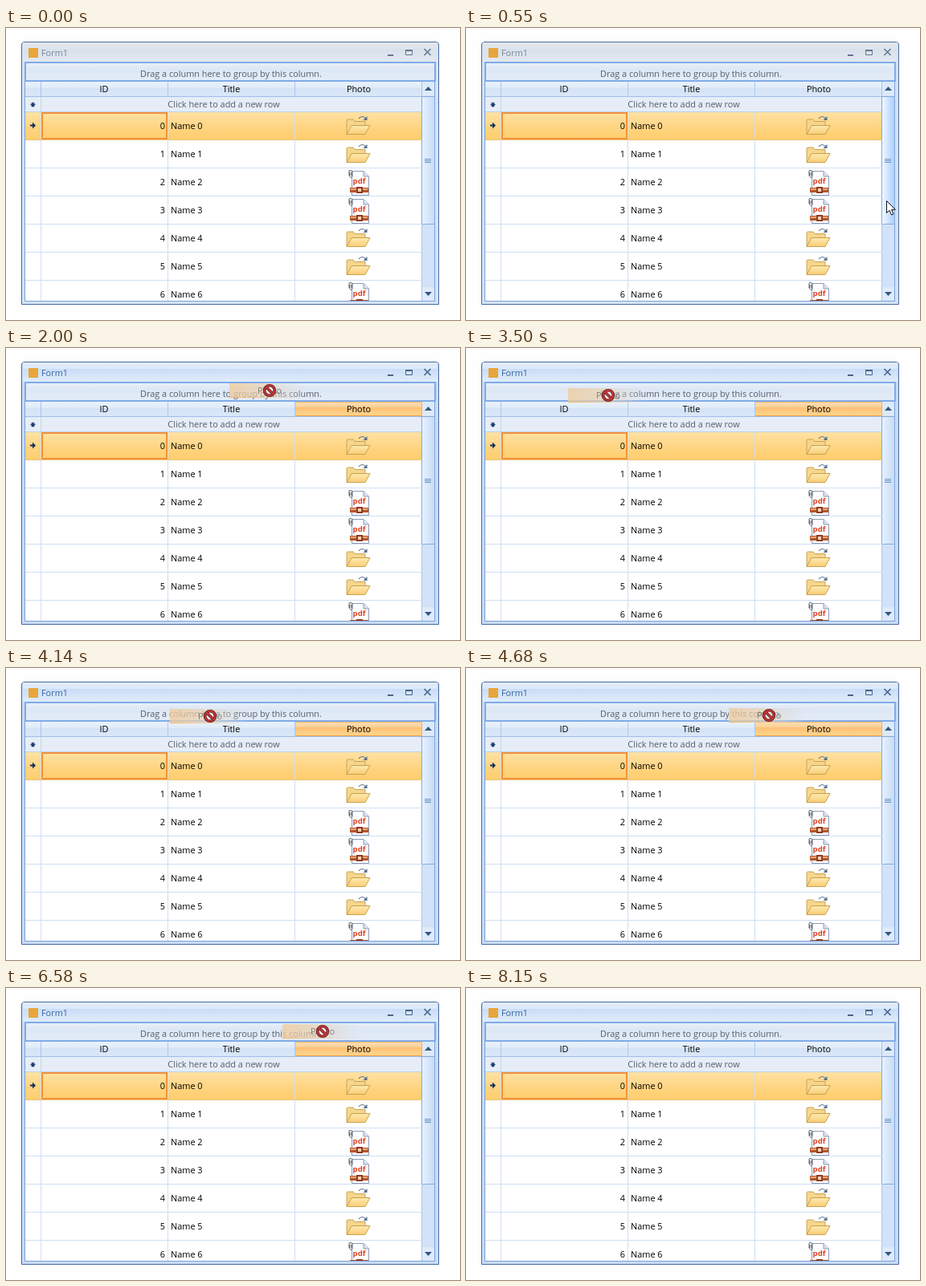
Recreate the animation shown at these times as an HTML page. Size 565 px wide and 364 px high, loop 8690 ms.

```html
<!DOCTYPE html>
<html lang="en">
<head>
<meta charset="utf-8">
<title>Grid column drag</title>
<style>
html, body { margin: 0; width: 100%; height: 100%; overflow: hidden; background: #fefefe; }
svg { display: block; width: 565px; height: 364px; }
text { font: 10.9px "Open Sans", "Noto Sans", sans-serif; fill: #000; }
rect { shape-rendering: crispEdges; }
.mid { text-anchor: middle; }
.end { text-anchor: end; }
.soft { fill: #535c6b; }
</style>
</head>
<body>
<svg id="stage" viewBox="0 0 565 364" xmlns="http://www.w3.org/2000/svg">
<defs>
  <clipPath id="client"><rect x="24" y="43" width="494" height="297"/></clipPath>
  <g id="folder">
    <path d="M1 23.500V6L2 5H9L11 7.500H24V13" fill="#f6d68d" stroke="#c9a352"/>
    <path d="M1 23.500L7 12.500H30L24 23.500Z" fill="url(#gFolder)" stroke="#c9a04e" stroke-linejoin="round"/>
    <path d="M16 4Q20 -1 25 4" fill="none" stroke="#566f8c" stroke-width="1.2"/>
    <path d="M26.500 1V6H21.500Z" fill="#566f8c"/>
  </g>
  <g id="pdf">
    <path d="M5.500 1.500H20L26.500 8V31.500H5.500Z" fill="#fdfdff" stroke="#8f9bb5"/>
    <path d="M20 1.500V8H26.500" fill="#dbe2ef" stroke="#8f9bb5"/>
    <text x="14.500" y="17" class="mid" style="font-size:9.600px;font-weight:700;fill:#e2401c">pdf</text>
    <rect x="3" y="22" width="23" height="6" fill="#b5562c"/>
    <rect x="4" y="23" width="21" height="2" fill="#eda676"/>
    <rect x="11" y="21" width="8" height="8" fill="#8d3d24"/>
    <rect x="13" y="23" width="4" height="4" fill="#f6d3ae"/>
    <path d="M2.500 3V8Q4 11 6 8V2Q5 -1 2 1V7M4.200 3V7" fill="none" stroke="#59626f"/>
  </g>
</defs>
<g id="scene"></g>
<g id="hover"></g>
<g id="cells"></g>
<g id="mark" fill="#10305c">
  <path d="M360 67V88" stroke="#10305c" stroke-width="2" stroke-dasharray="2 1"/>
  <path d="M358.500 63.500H361.500V65.500H364L360 70L356 65.500H358.500Z"/>
  <path d="M358.500 91.500H361.500V89H364L360 84.500L356 89H358.500Z"/>
</g>
<g id="ghost">
  <rect width="98" height="18" fill="url(#gGhost)"/>
  <rect y="17" width="98" height="1" fill="url(#gEdge)"/>
  <text x="50" y="13" class="mid" fill-opacity=".42">Photo</text>
</g>
<g id="point">
  <rect id="box" x="3.500" y="14.500" width="11" height="9" fill="#fff" stroke="#111" stroke-width="1.500" stroke-dasharray="2 1"/>
  <path d="M.5 .5V15.500L4 12.300L6.500 18L8.900 17L6.500 11.300H11.300Z" fill="#fff" stroke="#111"/>
</g>
<g id="deny" fill="none">
  <circle r="6.300" fill="#fff" fill-opacity=".75" stroke="#64191b" stroke-width="3.600"/>
  <path d="M-4.500 -4.500L4.500 4.500" stroke="#64191b" stroke-width="3.400"/>
  <circle r="6.300" stroke="#c8393a" stroke-width="1.800"/>
  <path d="M-4.500 -4.500L4.500 4.500" stroke="#c8393a" stroke-width="1.800"/>
</g>
</svg>
<script>
const LOOP = 8690;
const STEP = 400 / 3; // the screen refreshes 7.5 times a second
const NS = "http://www.w3.org/2000/svg";
const $ = id => document.getElementById(id);
const defs = document.querySelector("defs");

function add(parent, tag, attrs, content) {
  const el = document.createElementNS(NS, tag);
  for (const k in attrs) el.setAttribute(k, attrs[k]);
  if (content !== undefined) el.textContent = content;
  parent.appendChild(el);
  return el;
}
const rect = (p, x, y, width, height, fill, more) =>
  add(p, "rect", { x, y, width, height, fill, ...more });
const label = (p, x, y, s, cls = "") => add(p, "text", { x, y, class: cls }, s);
const line = (p, d, stroke, w = 1) => add(p, "path", { d, stroke, fill: "none", "stroke-width": w });

// Each stop is [offset, colour, opacity].
function gradient(id, stops, across) {
  const g = add(defs, "linearGradient", { id, x2: across ? 1 : 0, y2: across ? 0 : 1 });
  for (const [offset, color, alpha = 1] of stops)
    add(g, "stop", { offset, "stop-color": color, "stop-opacity": alpha });
}
// Two glossy bands that meet at the given offset.
const gloss = (id, at, a, b, c, d) => gradient(id, [[0, a], [at, b], [at, c], [1, d]]);

gloss("gBar", .35, "#e3ebf6", "#dae9fd", "#cadef7", "#e0ecfc");
gloss("gBarOff", .35, "#e3e7ec", "#dee5ec", "#d8e1ec", "#e3e8ef");
gloss("gPanel", .3, "#eaf0fa", "#dfe8f5", "#dde7f5", "#e3ebf7");
gloss("gHead", .45, "#eaf2fc", "#dfeaf8", "#d3e3f7", "#dae7f8");
gloss("gHot", .45, "#fff6d0", "#fff0b0", "#ffe995", "#fff0a8");
gloss("gDown", .4, "#fce0b8", "#fdcf92", "#fdc074", "#fed890");
gradient("gPick", [[0, "#ffe2a4"], [.5, "#ffd584"], [1, "#ffcd6a"]]);
gradient("gRow", [[0, "#fffbea"], [1, "#ffefbd"]]);
gradient("gFolder", [[0, "#ffeab0"], [1, "#f8cd76"]]);
gradient("gThumb", [[0, "#e9f2fe"], [1, "#c6dbf7"]], true);
gradient("gThumbHot", [[0, "#f3f9ff"], [1, "#a9ceff"]], true);
gradient("gGhost", [[0, "#f0cb9c", .8], [.35, "#ead0ac", .7], [.7, "#dfd8cd", .45], [1, "#dfe0e0", 0]], true);
gradient("gEdge", [[0, "#f1a54b", .7], [1, "#f3c07f", 0]], true);

// Window frame and title bar
const scene = $("scene");
const frame = add(scene, "path", {
  d: "M19.500 344.500V21Q19.500 17.500 23 17.500H535Q538.500 17.500 538.500 21V344.500Z",
  stroke: "#4a6ba0"
});
const bar = rect(scene, 21, 18, 516, 24);
rect(scene, 28, 25, 12, 12, "#e8a53a");
const title = label(scene, 44, 35, "Form1");
const buttons = add(scene, "g", {});
rect(buttons, 475, 33, 7, 2, "currentColor");
line(buttons, "M497.500 27V33.500H505.500V27M497 27.500H506M497 28.500H506", "currentColor");
line(buttons, "M520.500 26L528.500 34M528.500 26L520.500 34", "currentColor", 1.6);

rect(scene, 23, 42, 511, 299, "#7ba2d6");
rect(scene, 24, 43, 509, 297, "#fff");
rect(scene, 24, 43, 510, 23, "url(#gPanel)", { stroke: "#7fabe8", "stroke-width": 2 });
label(scene, 280, 61, "Drag a column here to group by this column.", "mid soft");

rect(scene, 24, 67, 494, 18, "url(#gHead)");
rect(scene, 24, 85, 494, 1, "#9ebfe9");
rect(scene, 24, 86, 494, 18, "#e6edf7");
rect(scene, 24, 104, 494, 1, "#b9d0ee");
rect(scene, 24, 105, 494, 35, "url(#gPick)");

// Scroll bar
rect(scene, 517, 67, 16, 273, "#d2e2f8");
rect(scene, 517, 67, 1, 273, "#a9c5e8");
for (const y of [67, 323]) rect(scene, 518, y, 15, 17, "#deeafa");
add(scene, "path", { d: "M521 78H530L525.500 73Z M521 329H530L525.500 334Z", fill: "#35577f" });
const thumb = rect(scene, 517.5, 85.5, 16, 159, "", { stroke: "#86aada" });
for (const y of [163, 165, 167]) rect(scene, 521, y, 8, 1, "#6d92c3");

// Highlights below the text
const hover = $("hover");
const rowHot = rect(hover, 24, 105, 494, 34, "url(#gRow)");
const headHot = rect(hover, 360, 67, 157, 18, "url(#gHot)");
const headDown = add(hover, "g", {});
rect(headDown, 360, 67, 157, 18, "url(#gDown)");
line(headDown, "M359.500 85.500V67.500H517.500V85", "#eeb468");
line(headDown, "M360 84.500H517", "#f29a3c");

// Grid text, lines and icons
const cells = add($("cells"), "g", { "clip-path": "url(#client)" });
["ID", "Title", "Photo"].forEach((s, i) => label(cells, 122 + 158.5 * i, 80, s, "mid"));
label(cells, 271, 99, "Click here to add a new row", "mid soft");
line(cells, "M30.500 95.500H36.500M33.500 92.500V98.500M31.500 93.500L35.500 97.500M35.500 93.500L31.500 97.500", "#1f3f70", 1.2);
add(cells, "path", { d: "M30 120.500H33V117.500L37 121.500L33 125.500V122.500H30Z", fill: "#10305c" });
for (let x = 43; x < 517; x += 158) {
  rect(cells, x, 67, 1, 18, "#a9c7ee");
  rect(cells, x, 105, 1, 235, "#cfdff3");
}
rect(cells, 43, 86, 1, 18, "#c5d7ee");
for (let i = 0; i < 7; i++) {
  const y = 105 + 35 * i;
  rect(cells, 24, y + 34, 494, 1, i ? "#cfdff3" : "#e9c77d");
  label(cells, 198, y + 21, i, "end");
  label(cells, 205, y + 21, "Name " + i);
  if (i % 4 < 2) add(cells, "use", { href: "#folder", x: 423, y: y + 4 });
  else add(cells, "use", { href: "#pdf", x: 425, y: y + 2 });
}
rect(cells, 45, 106, 155, 32, "none", { stroke: "#f2913b", "stroke-width": 2 });

// Moments of the story, counted in screen refreshes
const ENTER = 3, REACH = 9, PRESS = 11, DRAG = 12, DROP_ON = 41, DROP_OFF = 45,
  RELEASE = 55, LEAVE = 57, GONE = 61;

// Turning points of the dragged header: [refresh, left, top]
const turns = [
  [12, 372, 63], [15, 278, 44], [21, 278, 44], [28, 90, 52], [29, 90, 52],
  [33, 317, 50], [35, 327, 50], [37, 252, 52], [39, 251, 52], [40, 252, 47],
  [41, 258, 65], [44, 264, 70], [46, 317, 46], [49, 344, 45]
];
const mix = (a, b, u) => a + (b - a) * u;
const smooth = u => u * u * (3 - 2 * u);
const slow = u => 1 - Math.pow(1 - u, 1.5);
const clamp = u => Math.min(1, Math.max(0, u));

function ghostAt(n) {
  const i = turns.findLastIndex(k => k[0] <= n);
  const a = turns[i], b = turns[i + 1] || a;
  const u = smooth((n - a[0]) / (b[0] - a[0] || 1));
  return [mix(a[1], b[1], u), mix(a[2], b[2], u)].map(Math.round);
}
function pointerAt(n) {
  const inward = slow(clamp((n - ENTER) / (REACH - ENTER)));
  const outward = slow(clamp((n - LEAVE) / 3));
  const p = n < DRAG
    ? [mix(552, 430, inward), mix(259, 77, inward)]
    : [mix(394, 549, outward), mix(54, 344, outward)];
  return p.map(Math.round);
}

const mark = $("mark"), ghost = $("ghost"), deny = $("deny"), box = $("box"), point = $("point");
const show = (el, on) => el.setAttribute("display", on ? "inline" : "none");
const move = (el, x, y) => el.setAttribute("transform", `translate(${x} ${y})`);

function draw(t) {
  const n = Math.floor((t + 6) / STEP);
  const within = (a, b) => n >= a && n < b;
  const active = n >= PRESS;
  const dragging = within(DRAG, RELEASE);
  const dropping = within(DROP_ON, DROP_OFF);
  const free = within(ENTER, DRAG) || within(RELEASE, GONE);
  const [px, py] = pointerAt(n);
  const row = Math.floor((py - 105) / 35);

  frame.setAttribute("fill", active ? "#c9dcf5" : "#d5e3f5");
  bar.setAttribute("fill", active ? "url(#gBar)" : "url(#gBarOff)");
  title.style.fill = active ? "#34639f" : "#74869c";
  buttons.style.color = active ? "#4a6388" : "#66788f";

  const overThumb = within(ENTER, REACH) && px >= 517 && px < 533;
  thumb.setAttribute("fill", overThumb ? "url(#gThumbHot)" : "url(#gThumb)");
  show(rowHot, within(ENTER, REACH) && px < 517 && row > 0);
  rowHot.setAttribute("y", 105 + 35 * row);
  show(headHot, within(REACH - 1, PRESS));
  show(headDown, within(PRESS, RELEASE));

  show(mark, dropping);
  show(box, dropping);
  show(ghost, dragging);
  show(deny, dragging && !dropping);
  show(point, free || dropping);
  move(point, px, py);

  if (dragging) {
    const [x, y] = ghostAt(n);
    move(ghost, x, y);
    move(deny, x + 50, y + 9);
    if (dropping) move(point, x + 62, y + 9);
  }
}

const start = performance.now();
function tick() {
  draw((performance.now() - start) % LOOP);
  requestAnimationFrame(tick);
}
tick();
</script>
</body>
</html>
```
